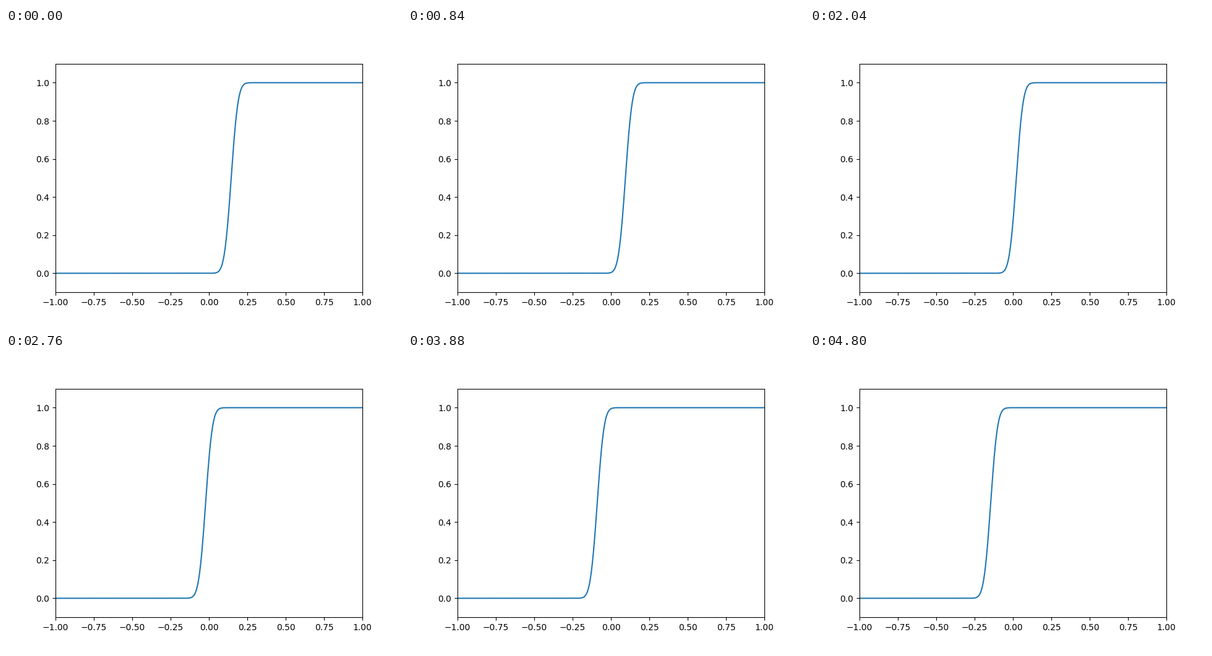
These frames come from a looping animation (640 px wide and 480 px high, 4840 ms). A matplotlib script:

```python
import math

import matplotlib.pyplot as plt
import numpy as np
from matplotlib.animation import FuncAnimation

FRAMES = 121
INTERVAL = 40
REACH = 0.145      # the step travels from +REACH to -REACH
STEEPNESS = 20

erf = np.vectorize(math.erf)
x = np.linspace(-1, 1, 1001)


def smooth_step(center):
    return 0.5 * (1 + erf(STEEPNESS * (x - center)))


def center_at(frame):
    return REACH * (1 - 2 * frame / (FRAMES - 1))


fig, ax = plt.subplots(figsize=(6.4, 4.8), dpi=100)
ax.set_xlim(-1, 1)
ax.set_ylim(-0.1, 1.1)
line, = ax.plot(x, smooth_step(center_at(0)), color="#1f77b4", lw=1.5)


def update(frame):
    line.set_ydata(smooth_step(center_at(frame)))
    return line,


anim = FuncAnimation(fig, update, frames=FRAMES, interval=INTERVAL,
                     repeat=True, repeat_delay=0)
plt.show()
```
